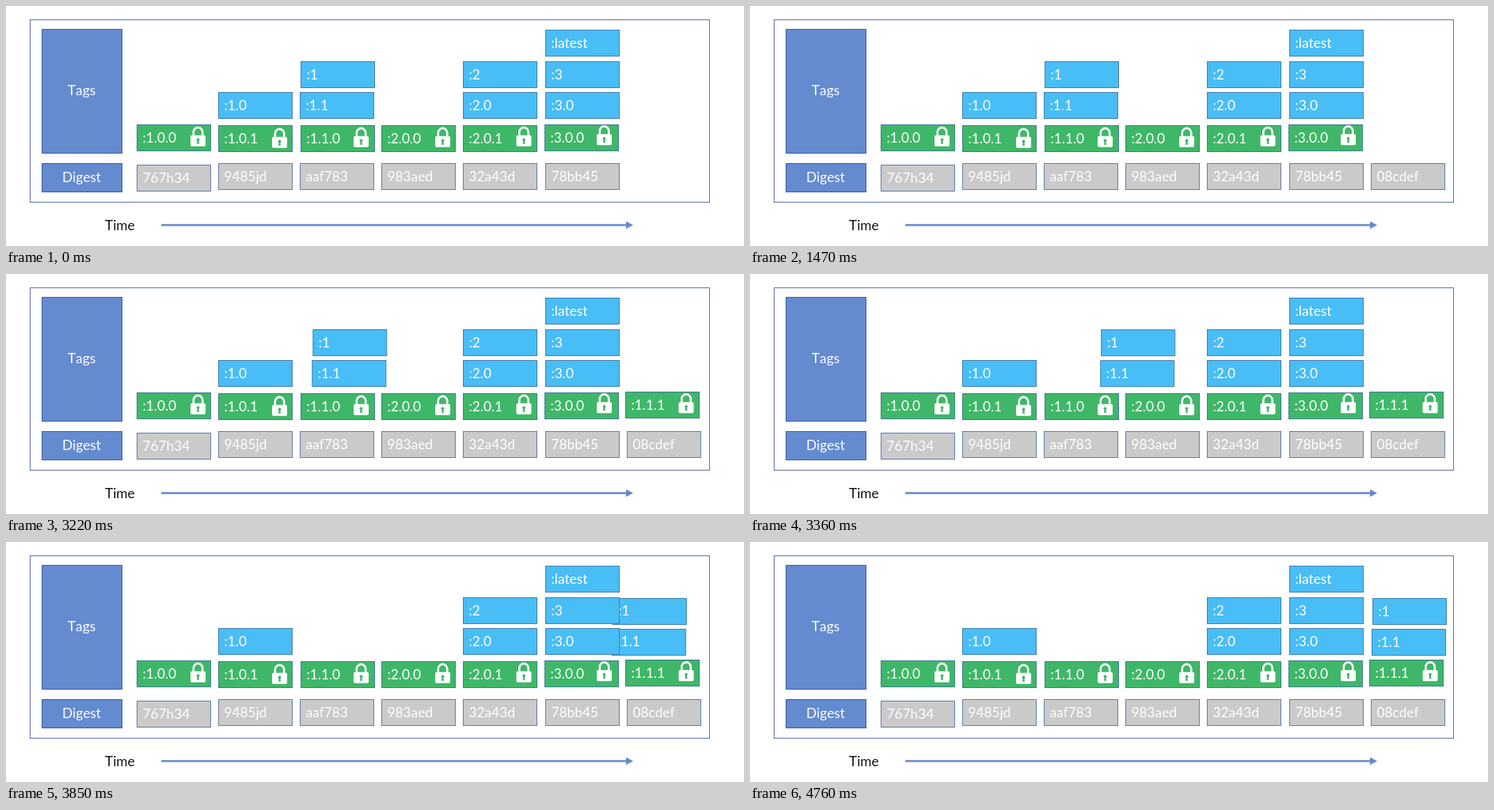
An HTML page for the animation above (4830 ms loop, 932 by 304 pixels).

```html
<!DOCTYPE html>
<html lang="en">
<head>
<meta charset="utf-8">
<style>
  html, body { margin: 0; width: 100%; height: 100%; overflow: hidden; background: #fff; }
  svg { display: block; }
  text { font: 17.3px Lato, Carlito, "Open Sans", sans-serif; font-kerning: none; fill: #fff; }
  .mid { text-anchor: middle; }
  .head { fill: #648ad0; stroke: #41619f; }
  .tag { fill: #49bdf5; stroke: #4580ae; }
  .lock { fill: #3fb768; stroke: #3f7f98; }
  .digest { fill: #cacaca; stroke: #6280ad; }
</style>
</head>
<body>
<svg id="stage" width="932" height="304" viewBox="0 0 932 304">
  <rect x="30.5" y="17.5" width="858" height="231" fill="none" stroke="#5f74aa"/>
  <rect class="head" x="45.5" y="29.5" width="101" height="157"/>
  <text class="mid" x="95.5" y="113">Tags</text>
  <rect class="head" x="45.5" y="199.5" width="101" height="36"/>
  <text class="mid" x="95.5" y="223">Digest</text>
  <text x="125" y="283.5" style="fill:#111">Time</text>
  <path d="M196 277.5H786" stroke="#6488c8" stroke-width="2.4"/>
  <path d="M783 272.8L792 277.5L783 282.2Z" fill="#6488c8"/>
</svg>
<script>
const stage = document.getElementById('stage');
const LOOP = 4830, STEP = 70;

function make(name, attrs, parent) {
  const el = document.createElementNS('http://www.w3.org/2000/svg', name);
  for (const key in attrs) el.setAttribute(key, attrs[key]);
  return parent.appendChild(el);
}

function place(el, x, y) {
  el.setAttribute('transform', `translate(${x} ${y})`);
}

function tile(kind, label, x, y) {
  const g = make('g', {}, stage);
  make('rect', { class: kind, x: .5, y: .5, width: 93, height: 33 }, g);
  make('text', { x: 7.5, y: 22.5 }, g).textContent = label;
  place(g, x, y);
  return g;
}

function lockTile(label, x, y, lockX, lockY) {
  const g = tile('lock', label, x, y);
  const icon = make('g', {}, g);
  make('path', { d: 'M-5.7 12V6.6a5.7 5.7 0 0 1 11.4 0V12', fill: 'none', stroke: '#fff', 'stroke-width': 2.6 }, icon);
  make('rect', { x: -9.5, y: 10.8, width: 19, height: 14, rx: 1.8, fill: '#fff' }, icon);
  make('path', { d: 'M-.9 17.5h1.8l.6 4.2h-3z', fill: '#3fb768' }, icon);
  make('circle', { cy: 16.3, r: 1.9, fill: '#3fb768' }, icon);
  place(icon, lockX - x, lockY - y);
  return g;
}

// Moving tags come first so they pass behind the other columns.
const movers = [
  { el: tile('tag', ':1', 372, 70), from: [372, 70], to: [786, 71] },
  { el: tile('tag', ':1.1', 371, 109), from: [371, 109], to: [785, 110] },
];

const columns = [165, 268, 371, 474, 577, 681, 784];
const digests = ['767h34', '9485jd', 'aaf783', '983aed', '32a43d', '78bb45', '08cdef']
  .map((id, i) => tile('digest', id, columns[i], i ? 199 : 201));

const versions = [
  [':1.0.0', 165, 150, 242.5, 153],
  [':1.0.1', 268, 151, 345.5, 155],
  [':1.1.0', 372, 151, 448.5, 154],
  [':2.0.0', 474, 151, 551.5, 154],
  [':2.0.1', 577, 151, 654, 153],
  [':3.0.0', 680, 150, 755.5, 151.5],
  [':1.1.1', 782, 149, 859, 151.5],
].map(v => lockTile(...v));

[
  [':1.0', 268, 109],
  [':2', 577, 70], [':2.0', 577, 109],
  [':latest', 681, 30], [':3', 681, 70], [':3.0', 681, 109],
].forEach(t => tile('tag', ...t));

const progress = (t, start, length) => Math.min(1, Math.max(0, (t - start) / length));
const ease = u => u < .5 ? 2 * u * u : 1 - 2 * (1 - u) ** 2;

function draw(now) {
  const t = Math.floor(now % LOOP / STEP) * STEP;
  digests[6].setAttribute('opacity', progress(t, 990, 222));
  versions[6].setAttribute('opacity', progress(t, 2878, 222));
  const k = ease(progress(t, 3099, 890));
  for (const { el, from, to } of movers)
    place(el, from[0] + (to[0] - from[0]) * k, from[1] + (to[1] - from[1]) * k);
}

const begin = performance.now();
function tick() {
  draw(performance.now() - begin);
  requestAnimationFrame(tick);
}
tick();
</script>
</body>
</html>
```
